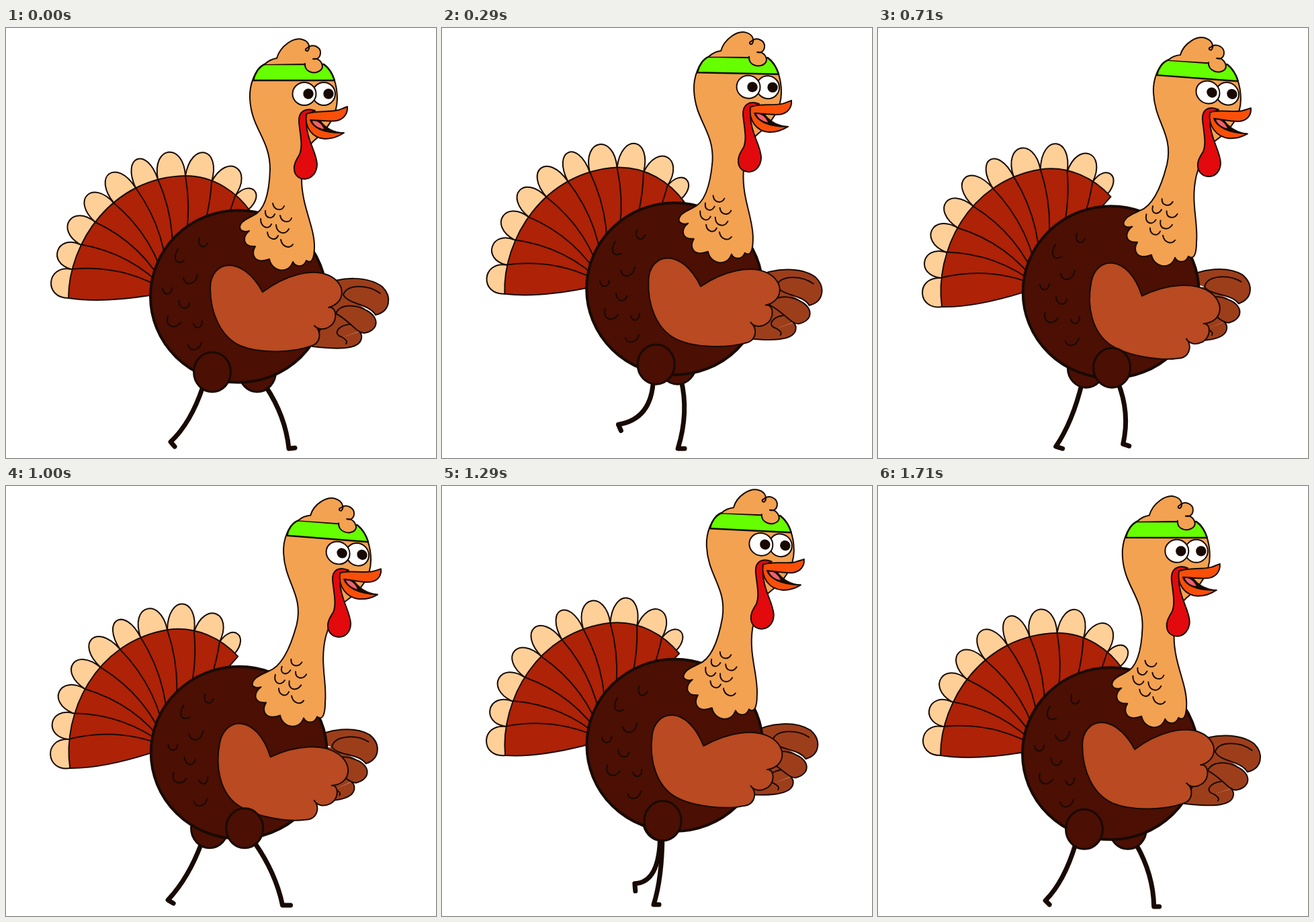
An HTML page with a canvas that plays this animation: 640 px wide and 640 px high, repeating every 1780 ms.

```html
<!DOCTYPE html>
<html lang="en">
<head>
<meta charset="utf-8">
<title>Walking turkey</title>
<style>
html, body { margin: 0; width: 100%; height: 100%; overflow: hidden; background: #fff; }
canvas { display: block; }
</style>
</head>
<body>
<canvas id="stage" width="640" height="640"></canvas>
<script>
const ctx = document.getElementById('stage').getContext('2d');
const LOOP = 1780, STEP = LOOP / 25, TAU = Math.PI * 2;
const INK = '#180a02', SKIN = '#f3a251', BODY = '#4b0f04', REAR = '#9d3e1b';

// fan rim: x, y, height of the feather that starts here
const rim = [[93, 402, 28], [97, 359, 28], [110, 322, 33], [133, 289, 37], [161, 261, 40], [193, 238, 39],
  [226, 225, 38], [267, 220, 40], [306, 229, 37], [341, 250, 26], [361, 270, 0]];
const hub = [240, 392];
const FAN = 'M93 402 C93 320 158 222 267 220 C310 220 345 245 365 275 L300 330 L214 398 C170 405 130 408 93 402Z';

const PLUMAGE = 'M288 312 C284 326 296 330 300 320 M256 329 C248 342 252 353 265 347 M264 372 C266 384 282 384 285 367 ' +
  'M233 388 C234 398 246 399 247 387 M257 406 C258 420 272 420 273 410 M241 429 C236 446 253 449 260 438 ' +
  'M279 440 C282 450 292 447 292 436 M271 472 C274 483 288 480 291 468';

const NECK = 'M385 54 C370 62 362 85 363 105 C365 150 393 165 393 210 C392 245 385 272 368 279 C358 284 352 287 350 291 ' +
  'C344 300 353 305 362 302 C352 310 351 326 371 325 C363 338 371 352 392 344 C395 362 420 368 427 348 ' +
  'C431 356 443 357 447 346 C455 352 459 343 459 325 C459 295 440 265 440 225 C441 195 450 175 458 168 ' +
  'C478 152 493 130 493 105 C493 85 486 62 473 54Z';
const SCALES = 'M397 261 C399 272 411 273 414 265 M386 272 C385 283 396 286 400 277 M408 279 C410 290 422 291 425 283 ' +
  'M379 284 C379 297 391 301 395 292 M402 293 C403 306 416 309 421 299 M389 304 C390 314 401 318 405 309 ' +
  'M409 315 C411 326 422 329 427 322';

const BAND = 'M368 78 C370 68 376 58 385 54 L473 54 C481 60 486 68 489 78Z';
const HAIR = 'M385 54 C390 49 396 46 403 45 C408 27 428 13 441 17 C452 20 453 30 449 34 C445 35 445 31 448 30 ' +
  'C456 22 469 28 468 38 C467 46 461 47 457 46 C468 44 474 56 469 62 C462 70 444 67 445 53';
const WATTLE = 'M460 123 C446 118 435 124 436 140 C438 160 442 175 437 188 C431 198 428 204 429 211 C431 231 462 230 463 203 ' +
  'C462 184 448 168 447 143 C447 132 453 126 460 123Z';
const MOUTH = 'M453 137 C460 152 480 160 503 156 C488 155 477 150 468 138Z';
const TONGUE = 'M455 138 C463 136 470 142 474 151 C465 150 458 145 455 138Z';
const BEAK = 'M447 128 C460 122 480 126 495 122 C503 119 506 118 508 117 C509 128 502 136 492 138 C480 140 465 137 453 137 ' +
  'C457 148 472 157 503 156 C497 160 488 165 475 165 C456 164 444 148 447 128Z';

const WING = 'M304 387 C304 347 350 335 382 393 C415 368 455 357 480 368 C507 380 506 409 480 416 ' +
  'C492 413 495 436 482 444 C474 450 464 449 459 443 C470 450 470 470 452 474 C430 482 380 486 349 473 C320 460 304 425 304 387Z';
const REAR_BASE = 'M450 400 L502 397 L535 418 L525 452 L460 474Z';
const REAR_FEATHERS = [
  'M456 474 C490 478 526 480 529 462 C530 457 528 454 526 452',
  'M491 425 C497 410 520 411 536 420 C556 430 556 450 533 454 C522 454 512 436 491 425Z',
  'M470 384 C500 368 540 370 560 385 C575 400 572 422 550 427 C540 410 510 412 502 397'];
const REAR_LINES = 'M502 397 C508 380 540 382 557 395 M511 441 C495 443 485 455 500 460 C508 465 508 468 506 470';

// time, thigh x, hip x, knee x y, ankle x y, toe x y
const nearLeg = [
  [0, 307, 293, 275, 588, 245, 616, 251, 623], [110, 309, 297, 282, 588, 243, 609, 247, 618],
  [290, 319, 315, 313, 582, 263, 590, 267, 599], [500, 331, 331, 329, 580, 283, 591, 287, 600],
  [600, 339, 344, 356, 576, 320, 605, 328, 611], [710, 348, 357, 375, 573, 364, 619, 373, 622],
  [820, 354, 366, 392, 574, 399, 625, 409, 627], [1000, 355, 370, 401, 576, 411, 624, 423, 624],
  [1290, 328, 327, 326, 584, 313, 623, 321, 623], [1710, 307, 294, 277, 589, 249, 617, 255, 623]];
const farLeg = [
  [0, 374, 387, 416, 578, 421, 626, 430, 625], [290, 350, 355, 367, 572, 350, 626, 360, 626],
  [500, 331, 331, 333, 576, 315, 623, 325, 623], [710, 310, 304, 290, 586, 265, 623, 275, 626],
  [1000, 303, 291, 272, 583, 241, 616, 249, 621], [1140, 308, 299, 290, 590, 253, 598, 259, 606],
  [1290, 328, 326, 326, 590, 289, 592, 290, 603], [1500, 352, 356, 372, 580, 345, 610, 352, 615],
  [1710, 372, 384, 410, 578, 411, 626, 419, 626]];

// smooth periodic interpolation through the keys
function poseAt(keys, t) {
  const n = keys.length;
  const key = i => {
    const turn = Math.floor(i / n), k = keys[i - turn * n];
    return [k[0] + turn * LOOP, ...k.slice(1)];
  };
  let i = n - 1;
  while (keys[i][0] > t) i--;
  const [a, b, c, d] = [-1, 0, 1, 2].map(o => key(i + o));
  const span = c[0] - b[0], u = (t - b[0]) / span;
  return b.map((v, j) => {
    const m0 = (c[j] - a[j]) / (c[0] - a[0]) * span, m1 = (d[j] - v) / (d[0] - b[0]) * span;
    const e = c[j] - v;
    return v + u * (m0 + u * (3 * e - 2 * m0 - m1 + u * (m0 + m1 - 2 * e)));
  });
}

function shape(d, fill, width = 2, stroke = INK) {
  const path = new Path2D(d);
  if (fill) { ctx.fillStyle = fill; ctx.fill(path); }
  if (width) { ctx.lineWidth = width; ctx.strokeStyle = stroke; ctx.stroke(path); }
}

function oval(x, y, rx, ry, fill, width = 2) {
  ctx.beginPath();
  ctx.ellipse(x, y, rx, ry, 0, 0, TAU);
  ctx.fillStyle = fill;
  ctx.fill();
  if (width) { ctx.lineWidth = width; ctx.strokeStyle = INK; ctx.stroke(); }
}

function group(draw, ...setup) {
  ctx.save();
  setup.forEach(f => f());
  draw();
  ctx.restore();
}

const turn = (degrees, x, y) => () => {
  ctx.translate(x, y);
  ctx.rotate(degrees * Math.PI / 180);
  ctx.translate(-x, -y);
};

function tail() {
  rim.slice(0, -1).forEach(([x, y, h], i) => {
    const [x2, y2] = rim[i + 1], len = Math.hypot(x2 - x, y2 - y), k = h / 0.75 / len;
    const nx = (y2 - y) * k, ny = (x - x2) * k;
    const ex = (x2 - x) * 0.08, ey = (y2 - y) * 0.08;
    shape(`M${x} ${y} C${x + nx - ex} ${y + ny - ey} ${x2 + nx + ex} ${y2 + ny + ey} ${x2} ${y2}`, '#ffcf98');
  });
  shape(FAN, '#ae2207');
  rim.slice(1, -1).forEach(([x, y]) => {
    const dx = hub[0] - x, dy = hub[1] - y;
    shape(`M${x} ${y} Q${x + dx / 2 + 0.17 * dy} ${y + dy / 2 - 0.17 * dx} ${hub[0]} ${hub[1]}`);
  });
}

function leg(keys, t, bob) {
  const [, thigh, hip, kx, ky, ax, ay, tx, ty] = poseAt(keys, t);
  shape(`M${hip} ${534 + bob} Q${kx} ${ky} ${ax} ${ay} L${tx} ${ty}`, null, 7);
  oval(thigh, 512 + bob, 27.5, 29.5, BODY, 3);
}

function head() {
  shape(BAND, '#66ff00', 2.5);
  shape(HAIR, SKIN);
  oval(473, 98, 17, 17, '#fff');
  oval(444, 98, 17.5, 17, '#fff');
  oval(480, 98, 7.7, 7.7, INK, 0);
  oval(450, 98, 7.7, 7.7, INK, 0);
  shape(WATTLE, '#e20a0d');
  shape(MOUTH, INK, 1);
  shape(TONGUE, '#f4606a', 1);
  shape(BEAK, '#f94f08');
}

const bounce = t => {
  const a = TAU * t / (LOOP / 2);
  return 7 * Math.cos(a) + 0.8 * Math.cos(2 * a);
};

function draw(t) {
  const bob = bounce(t) - bounce(0);
  const sway = 1 - Math.cos(TAU * t / LOOP);
  const lean = sway / 1.926;
  const lift = () => ctx.translate(0, bob);

  // the neck bends: fixed at the chest, following the head at the top
  const bend = d => d.replace(/(\d+) (\d+)/g, (_, x, y) => {
    const g = Math.min(50, Math.max(16, 16 + 0.24 * (308 - y)));
    const drop = (0.08 * (x - 400) - 0.012 * (y - 150)) * (g - 16) / 34;
    return `${+x + g * lean} ${+y + drop * lean}`;
  });

  ctx.clearRect(0, 0, 640, 640);
  ctx.lineCap = ctx.lineJoin = 'round';

  group(tail, lift, turn(-4.47 * sway, 231, 397));
  group(() => {
    shape(REAR_BASE, REAR, 0);
    REAR_FEATHERS.forEach(d => shape(d, REAR));
    shape(REAR_LINES);
  }, lift, turn(-3.05 * sway, 434, 560));
  leg(farLeg, t, bob);
  group(() => {
    oval(346 + 0.4 * sway, 399.5, 131, 128, BODY, 4);
    ctx.translate(4.4 * sway, 0);
    shape(PLUMAGE);
  }, lift);
  group(() => {
    shape(bend(NECK), SKIN);
    shape(bend(SCALES));
  }, lift);
  group(head, lift, () => ctx.transform(1, 0.08 * lean, 0, 1 - 0.012 * lean, 50 * lean, (1.8 - 32) * lean));
  group(() => shape(WING, '#b94a21'), lift, turn(6.1 * sway, 325, 455));
  leg(nearLeg, t, bob);
}

const start = performance.now();
function tick() {
  const t = (performance.now() - start) % LOOP;
  draw(Math.min(24, Math.floor((t + 3) / STEP)) * STEP);
  requestAnimationFrame(tick);
}
tick();
</script>
</body>
</html>
```
